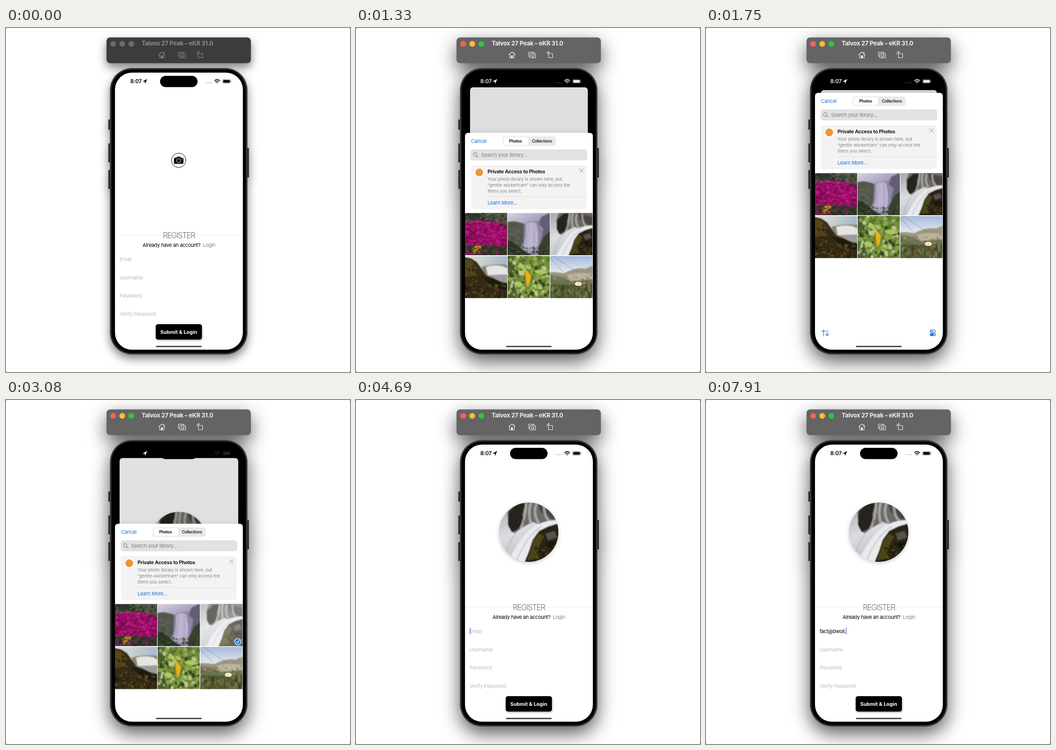
An HTML page for the animation above (8 s loop, 748 px wide and 748 px high).

```html
<!DOCTYPE html>
<html lang="en">
<head>
<meta charset="utf-8">
<title>Register screen</title>
<style>
  html, body { margin: 0; width: 100%; height: 100%; overflow: hidden; background: #555; }
  svg { display: block; width: 100vw; height: 100vh; }
  text { font: 400 11px Inter, "Open Sans", sans-serif; letter-spacing: -.36px; }
  .mid { text-anchor: middle; }
  .hint { fill: #bdbdbf; }
  .blue { fill: #2474d2; }
  .semi { font-weight: 600; letter-spacing: -.3px; }
  .tab { font-size: 8.7px; font-weight: 500; letter-spacing: -.25px; }
  .note { font-size: 9.6px; letter-spacing: -.12px; fill: #87878b; }
  .title { font-size: 13px; font-weight: 700; letter-spacing: -.3px; }
  .heading { font-size: 17px; font-weight: 200; letter-spacing: -1.2px; fill: #333; }
  .clock { font-size: 11.6px; font-weight: 600; letter-spacing: -.1px; }
  .line { fill: none; stroke: currentColor; stroke-linecap: round; stroke-linejoin: round; }
  .soft { filter: url(#blur); }

  #shell { filter: drop-shadow(0 9px 10px rgba(0, 0, 0, .5)); }
  #bar { fill: #3c3c3c; }
  #tools { color: #8b8b8b; }
  #lights circle { fill: #6b6b6b; }
  .active #shell { filter: drop-shadow(0 15px 20px rgba(0, 0, 0, .65)); }
  .active #bar { fill: #646464; }
  .active #tools { color: #efefef; }
  .active #lights circle:nth-child(1) { fill: #ff5f57; }
  .active #lights circle:nth-child(2) { fill: #febc2e; }
  .active #lights circle:nth-child(3) { fill: #28c840; }

  #avatar { filter: drop-shadow(0 2px 4px rgba(0, 0, 0, .22)); }
  #submit { filter: drop-shadow(1px 2px 2px rgba(0, 0, 0, .3)); }
  #sheetBase { filter: drop-shadow(0 0 8px rgba(0, 0, 0, .08)); }
</style>
</head>
<body>
<svg id="stage" viewBox="0 0 748 748">
  <defs>
    <filter id="blur" x="-.1" y="-.1" width="1.2" height="1.2"><feGaussianBlur stdDeviation=".9"/></filter>
    <clipPath id="screenClip"><rect x="237" y="97" width="278" height="602.6" rx="37"/></clipPath>
    <clipPath id="avatarClip"><circle cx="375.5" cy="287.5" r="64.5"/></clipPath>
    <linearGradient id="mist" x2=".5" y2="1">
      <stop stop-color="#d6d2e0"/><stop offset=".4" stop-color="#a9a1bf"/><stop offset="1" stop-color="#8f86ab"/>
    </linearGradient>
    <linearGradient id="dusk" x2="1" y2=".3">
      <stop stop-color="#e3e2d2"/><stop offset="1" stop-color="#a3b6c9"/>
    </linearGradient>
    <linearGradient id="day" x2="0" y2="1">
      <stop stop-color="#a5b9da"/><stop offset=".42" stop-color="#e9ecf1"/>
    </linearGradient>
    <linearGradient id="spray" x2=".5" y2="1">
      <stop stop-color="#a4a5a6"/><stop offset=".5" stop-color="#dcdde0"/><stop offset="1" stop-color="#b4b9c2"/>
    </linearGradient>

    <!-- flower bed -->
    <symbol id="flowers" viewBox="0 0 92 92">
      <path d="M0 0H92V92H0Z" fill="#30362a"/>
      <path d="M28 0H92V26L50 14Z" fill="#4c5442"/>
      <path d="M0 24Q26 10 54 18L92 32V74L50 70L0 68Z" fill="#8d0f5c"/>
      <g class="dots soft"></g>
    </symbol>
    <!-- tall waterfall -->
    <symbol id="falls" viewBox="0 0 92 92">
      <path d="M0 0H92V92H0Z" fill="url(#mist)"/>
      <g class="soft">
        <path d="M-4 20L14 18L32 22L42 28L36 58L30 74L-4 76Z" fill="#55594d"/>
        <path d="M36 24Q50 16 66 18L74 8L96 -2V64L68 80L34 78Z" fill="#8c85a3"/>
        <path d="M74 8L96 -2V56L72 62L78 34L68 24Z" fill="#645f72"/>
        <path d="M40 24Q52 17 62 22Q70 50 64 78H34Q42 50 40 24" fill="#bcb4d0"/>
        <path d="M46 24L40 74M58 23L58 74" stroke="#9a91b5" stroke-width="2" opacity=".7"/>
        <path d="M96 36L80 50L68 72L66 96H96Z" fill="#38402d"/>
        <path d="M-4 58Q18 62 32 80L60 96H-4Z" fill="#2b3521"/>
        <path d="M34 76Q50 72 66 78L58 88L42 86Z" fill="#a9a1c0"/>
      </g>
      <g class="dots soft"></g>
    </symbol>
    <!-- silky stream -->
    <symbol id="stream" viewBox="0 0 92 92">
      <path d="M0 0H92V92H0Z" fill="url(#spray)"/>
      <g class="soft">
        <path d="M20 -4H96V34L72 37L52 30L34 40L24 48L15 38L13 16Z" fill="#6d6a65"/>
        <path d="M15 14L28 2L42 0L36 18L40 30L28 42L20 46L14 34Z" fill="#25221c"/>
        <path d="M60 0L76 4L92 8V28L78 24L64 14Z" fill="#4c473f"/>
        <path d="M42 -2Q42 18 34 40M50 -2Q44 16 50 34M58 2Q52 18 62 32M70 2Q68 20 82 34" fill="none" stroke="#b9b9ba" stroke-width="4" opacity=".75"/>
        <path d="M92 27Q62 28 46 44Q28 60 12 96H42Q46 66 58 50Q70 38 92 36Z" fill="#e9eaed"/>
        <path d="M66 37Q44 50 26 92M24 50Q14 64 6 92" fill="none" stroke="#b3b6bd" stroke-width="2" opacity=".6"/>
        <path d="M96 31L76 37L62 44L52 58L47 74L38 96H96Z" fill="#292417"/>
        <path d="M53 60L62 48L70 52L62 68L60 86L44 90Z" fill="#4a4517"/>
        <path d="M72 48L86 44L90 54L76 59Z" fill="#55524b"/>
        <path d="M70 64L92 60V74L78 70Z" fill="#14120e"/>
      </g>
      <g class="dots soft"></g>
    </symbol>
    <!-- river bend -->
    <symbol id="river" viewBox="0 0 92 92">
      <path d="M0 0H92V92H0Z" fill="url(#dusk)"/>
      <g class="soft">
        <path d="M36 24Q62 16 96 20V48H44Z" fill="#8a8468"/>
        <path d="M46 24Q64 18 84 23L96 30V44H50Z" fill="#e6e5e2"/>
        <path d="M44 42L96 40V66L60 56Z" fill="#9b9d9c"/>
        <path d="M-4 2L14 6L26 14L36 28L46 42L62 48L78 56L96 60V96H-4Z" fill="#352c15"/>
        <path d="M-4 6L14 10L24 22L22 42L-4 46Z" fill="#55441f"/>
        <path d="M34 44L60 50L96 62V76L60 66Z" fill="#1f1b10"/>
      </g>
      <g class="dots soft"></g>
    </symbol>
    <!-- leaves -->
    <symbol id="leaves" viewBox="0 0 92 92">
      <path d="M0 0H92V92H0Z" fill="#748c3c"/>
      <path d="M0 0H18L12 50L22 92H0Z" fill="#4d5b37"/>
      <g class="dots soft"></g>
      <g class="soft">
        <path d="M20 22Q38 14 54 26Q38 36 20 22M58 34Q72 24 88 36Q72 46 58 34M52 64Q66 58 76 70Q62 78 52 64M14 60Q24 50 34 62Q24 76 14 60" fill="#b0c860"/>
        <path d="M28 0Q38 28 52 42T68 92" fill="none" stroke="#3f5220" stroke-width="1.5"/>
        <path d="M38 32Q53 36 50 54L43 67Q35 52 38 32Z" fill="#e3b515"/>
        <path d="M38 32Q33 50 42 67Q39 50 38 32Z" fill="#7c6a12"/>
      </g>
    </symbol>
    <!-- dunes -->
    <symbol id="dunes" viewBox="0 0 92 92">
      <path d="M0 0H92V92H0Z" fill="url(#day)"/>
      <g class="soft">
        <path d="M-4 36Q14 34 30 38Q56 24 76 28L96 20V72H-4Z" fill="#9c967f"/>
        <path d="M34 42Q56 34 96 40V50L46 54Z" fill="#bdb49e"/>
        <path d="M-4 40L26 46L46 56L96 50V96H-4Z" fill="#6d7150"/>
        <path d="M-4 62L96 62V96H-4Z" fill="#4a5630"/>
      </g>
      <path d="M0 4L32 40M6 0L60 36" stroke="#6d7480" stroke-width=".6"/>
      <g class="dots soft"></g>
      <ellipse cx="61" cy="61" rx="7.5" ry="4.5" fill="#f3f0d4"/>
      <circle cx="61" cy="61" r="2" fill="#e8cf56"/>
    </symbol>
  </defs>

  <rect width="748" height="748" rx="3" fill="#fff"/>

  <!-- simulator window -->
  <g id="shell">
    <rect id="bar" x="218.5" y="20.5" width="314" height="56" rx="8"/>
    <path d="M224.5 199V221M224.5 251V292M224.5 309V350M526.2 261V325" stroke="#2b2b2c" stroke-width="4"/>
    <rect x="226" y="87" width="299" height="623" rx="48" fill="#2c2c2e"/>
  </g>
  <rect x="227" y="88" width="297" height="621" rx="47" fill="none" stroke="#4a4a4c"/>
  <rect x="229.5" y="90.5" width="292" height="616" rx="44" fill="#000"/>
  <g id="lights">
    <circle cx="233" cy="34.5" r="6.2"/><circle cx="252.7" cy="34.5" r="6.2"/><circle cx="272.5" cy="34.5" r="6.2"/>
  </g>
  <g id="tools">
    <text class="title" x="295" y="38.3" fill="currentColor">Talvox 27 Peak – eKR 31.0</text>
    <g class="line" stroke-width="1.1">
      <path d="M332 58.5L339 52L346 58.5M334 57.5V65H344V57.5M343.5 55V52.5"/>
      <path d="M337.5 65V60H340.5V65Z" fill="currentColor"/>
      <path d="M377 61.5H375V52.5H387V54M378 56H381L382.5 54.5H386L387.5 56H390.5V65H378Z"/>
      <circle cx="384.3" cy="60.4" r="2.7"/>
      <path d="M418.5 55.5H427.5V64.5H418.5ZM415.5 57V54Q415.5 52.5 417 52.5H420M418.5 50.8L420.3 52.5L418.5 54.2"/>
    </g>
  </g>

  <g clip-path="url(#screenClip)">
    <rect x="237" y="97" width="278" height="603"/>
    <!-- register page -->
    <g id="page">
      <rect x="237" y="97" width="278" height="603" rx="7" fill="#fff"/>
      <g id="picker">
        <circle cx="375.5" cy="287.7" r="15.7" fill="#fff" stroke="#000"/>
        <path d="M367 282.2H370.5L372 279.8H379L380.5 282.2H384Q385.8 282.2 385.8 284V293.5Q385.8 295.3 384 295.3H367Q365.2 295.3 365.2 293.5V284Q365.2 282.2 367 282.2Z"/>
        <circle cx="375.5" cy="288.3" r="4.3" fill="none" stroke="#fff" stroke-width="1.1"/>
        <circle cx="382.8" cy="284.7" r=".9" fill="#fff"/>
      </g>
      <g id="avatar">
        <g clip-path="url(#avatarClip)"><use href="#stream" x="311" y="223" width="129" height="129"/></g>
      </g>
      <path d="M237 450.5H336M415 450.5H515" stroke="#ececec"/>
      <text class="heading" x="341" y="456.8">REGISTER</text>
      <text x="297" y="475.5">Already have an account?</text>
      <text x="428" y="475.5" fill="#858585">Login</text>
      <text id="email" x="247" y="506.5"></text>
      <rect id="caret" y="495" width="1.3" height="14.5" fill="#3a6fd0"/>
      <text class="hint" x="247" y="546.5">Username</text>
      <text class="hint" x="247" y="586.3">Password</text>
      <text class="hint" x="247" y="625.7">Verify Password</text>
      <rect id="submit" x="325.5" y="644" width="100.5" height="33.5" rx="5"/>
      <text class="mid" x="375.7" y="665" fill="#fff" style="font-weight:700;letter-spacing:0">Submit &amp; Login</text>
      <rect id="dim" x="237" y="97" width="278" height="603" rx="7"/>
    </g>

    <!-- photo sheet -->
    <g id="sheet">
      <rect id="sheetBase" x="237" width="278" height="640" rx="6.5" fill="#fff"/>
      <text class="blue" x="250" y="22">Cancel</text>
      <rect x="319" y="7.8" width="115" height="20.5" rx="5" fill="#e9e9ea"/>
      <rect x="320.2" y="9" width="54.5" height="18" rx="4.5" fill="#fff" stroke="#dcdcde" stroke-width=".6"/>
      <text class="tab mid" x="347" y="21.2" style="font-weight:600">Photos</text>
      <text class="tab mid" x="404.3" y="21.2">Collections</text>
      <rect x="249" y="36" width="254" height="24" rx="6" fill="#e2e2e3"/>
      <g class="line" color="#7d7d81" stroke-width="1.2">
        <circle cx="259.2" cy="47" r="3.8"/><path d="M262 50L265.2 53.2"/>
      </g>
      <text x="272" y="52" fill="#828286">Search your library...</text>
      <rect x="250" y="70" width="251.5" height="96" rx="6" fill="#f3f3f3"/>
      <rect x="258" y="76" width="20" height="20" rx="4.5" fill="#fff"/>
      <circle cx="268" cy="86" r="8.5" fill="#f0943a"/>
      <text class="semi" x="286" y="88">Private Access to Photos</text>
      <path class="line" color="#8c8c90" d="M485.5 77.5L495 87M495 77.5L485.5 87"/>
      <text class="note" x="286" y="103.6">Your photo library is shown here, but</text>
      <text class="note" x="286" y="116.6">“gentle-wickertram” can only access the</text>
      <text class="note" x="286" y="129.6">items you select.</text>
      <path d="M286 139H501.5" stroke="#dfdfe0"/>
      <text class="blue" x="286" y="156.3">Learn More...</text>
      <g id="grid"></g>
      <g id="check">
        <rect x="422.6" y="174.4" width="92.4" height="91.7" fill="#fff" opacity=".3"/>
        <circle cx="504" cy="256.5" r="6.8" fill="#1f7bf0" stroke="#fff" stroke-width="1.2"/>
        <path class="line" color="#fff" stroke-width="1.3" d="M501 256.7L503.2 259.2L507.2 253.8"/>
      </g>
      <g class="line" color="#2474d2" stroke-width="1.2">
        <path d="M255.5 528V516M252 519.5L255.5 516L259 519.5M263.5 516V528M260 524.5L263.5 528L267 524.5"/>
        <rect x="487.5" y="515.8" width="11.5" height="5" rx="2.5"/>
        <rect x="487.5" y="523.2" width="11.5" height="5" rx="2.5" fill="currentColor"/>
        <circle cx="490" cy="518.3" r="2.2"/>
        <circle cx="496.5" cy="525.7" r="1.6" fill="#fff" stroke="none"/>
      </g>
    </g>

    <rect x="335" y="104" width="81.5" height="24.5" rx="12.25"/>
    <g id="status">
      <text id="clock" class="clock" x="270.3" y="120.4">8:07</text>
      <path id="arrow" d="M307 111L297 116.2L301.8 116.8L302.4 121.6Z"/>
      <g fill="currentColor" opacity=".35">
        <circle cx="435" cy="119" r="1"/><circle cx="438.8" cy="119" r="1"/>
        <circle cx="442.6" cy="119" r="1"/><circle cx="446.4" cy="119" r="1"/>
      </g>
      <g class="line" stroke-width="1.8">
        <path d="M453.8 114.3Q459.2 109.5 464.6 114.3M455.9 116.8Q459.2 113.9 462.5 116.8"/>
        <path d="M457.8 118.7Q459.2 117.6 460.6 118.7L459.2 120.1Z" fill="currentColor" stroke-width=".5"/>
      </g>
      <rect x="470.8" y="111.6" width="17.5" height="8.8" rx="2.7" class="line" opacity=".4"/>
      <rect x="472.2" y="113" width="14.7" height="6" rx="1.6" fill="currentColor"/>
      <path d="M489.6 114.5V117.5" class="line" opacity=".4"/>
    </g>
    <rect x="326" y="691" width="99.5" height="3" rx="1.5" fill="#4c4c4c"/>
  </g>
</svg>

<script>
const $ = id => document.getElementById(id);
const LOOP = 8000, STEP = 70;
const FOCUS = 1050, OPEN = 1080, OPENED = 1750, CLOSE = 3012, PICKED = 3080, CLOSED = 3570;
const CARET_ON = 4690, CARET_FADE = 5460;
const ADDRESS = 'fact@bwoli.';
const KEYS = [5740, 6230, 6510, 6650, 7000, 7210, 7280, 7420, 7560, 7770, 7910];
const PHOTOS = ['flowers', 'falls', 'stream', 'river', 'leaves', 'dunes'];

function seeded(seed) {
  return () => (seed = seed * 16807 % 2147483647) / 2147483647;
}

// Sprinkles soft blots over one area of a photo; tall > 1 makes upright blades.
function scatter(id, count, [x, y, w, h], size, colors, tall = .65) {
  const rand = seeded(id.length * 7919 + count);
  let out = '';
  for (let i = 0; i < count; i++) {
    const cx = x + rand() * w, cy = y + rand() * h, r = size * (.5 + rand());
    out += `<ellipse cx="${cx.toFixed(1)}" cy="${cy.toFixed(1)}" rx="${r.toFixed(1)}" ` +
      `ry="${(r * tall).toFixed(1)}" fill="${colors[i % colors.length]}"/>`;
  }
  document.querySelector(`#${id} .dots`).innerHTML += out;
}

scatter('flowers', 90, [0, 0, 92, 22], 2, ['#4a5340', '#1f261b', '#666b5c']);
scatter('flowers', 260, [0, 18, 92, 52], 2.2, ['#c4148a', '#d01c96', '#a30f6c', '#5c0a3a']);
scatter('flowers', 90, [0, 68, 92, 24], 2.2, ['#1d2118', '#434930', '#9d1470']);
scatter('flowers', 16, [17, 72, 18, 15], 2.4, ['#f2a91c', '#e98717']);
scatter('falls', 70, [0, 74, 92, 18], 2, ['#3b4729', '#1e2717', '#4a5438']);
scatter('falls', 30, [0, 24, 34, 44], 2.5, ['#4a5040', '#62655a']);
scatter('stream', 50, [56, 58, 36, 34], 1.8, ['#544f18', '#1d1910', '#383115']);
scatter('river', 150, [0, 60, 92, 32], 2, ['#50481a', '#241f10', '#655826', '#181409']);
scatter('river', 40, [0, 20, 28, 40], 2.2, ['#2a2312', '#5c4a22']);
scatter('leaves', 170, [0, 0, 92, 92], 3.2, ['#8ba548', '#57742c', '#bccb90', '#33461c'], 1.2);
scatter('dunes', 60, [0, 42, 92, 22], 1.8, ['#7d8062', '#5f6848', '#a29b82']);
scatter('dunes', 150, [0, 64, 92, 28], 1.2, ['#5f7038', '#2f3c1e', '#7c4a38', '#7f8a52'], 3);

$('grid').innerHTML = PHOTOS.map((id, i) =>
  `<use href="#${id}" x="${237 + i % 3 * 92.8}" y="${174.4 + (i > 2) * 93.2}" width="91.7" height="91.7"/>`).join('');

// Critically damped spring from 0 to 1.
function spring(ms) {
  const x = Math.max(0, ms) * .0133;
  return 1 - (1 + x) * Math.exp(-x);
}

function presented(t) {
  if (t < OPEN || t >= CLOSED) return 0;
  if (t < OPENED) return spring(t - OPEN);
  return t < PICKED ? 1 : 1 - spring(t - CLOSE);
}

function show(id, on) {
  $(id).style.display = on ? '' : 'none';
}

function drawSheet(t) {
  const p = presented(t), picked = t >= PICKED;
  const scale = 1 - .0935 * p;
  $('page').setAttribute('transform',
    `translate(376 ${97 + 38 * p}) scale(${scale}) translate(-376 -97)`);
  $('dim').setAttribute('opacity', .155 * p);
  $('sheet').setAttribute('transform', `translate(0 ${141 + 559 * (1 - p)})`);
  show('sheet', p > 0);
  show('check', picked);
  show('avatar', picked);
  show('picker', !picked);
  const light = p > .4;
  $('status').style.color = light ? (picked ? '#222' : '#eee') : '#000';
  $('clock').setAttribute('fill', light && !picked ? '#eee' : '#000');
  $('arrow').setAttribute('fill', light ? '#fff' : '#000');
}

function drawField(t) {
  const typed = KEYS.filter(k => t >= k).length, email = $('email');
  email.textContent = typed ? ADDRESS.slice(0, typed) : 'Email';
  email.setAttribute('class', typed ? '' : 'hint');
  $('caret').setAttribute('x', typed ? 247 + email.getComputedTextLength() : 247.5);
  let alpha = t < CARET_ON ? 0 : 1;
  if (t >= CARET_FADE && !typed) alpha = Math.max(0, 1 - ((t - CARET_FADE) / STEP + 1) / 3);
  $('caret').setAttribute('opacity', alpha);
}

const start = performance.now();
let last = -1;

function frame() {
  const now = Math.max(0, performance.now() - start) % LOOP;
  const t = Math.floor(now / STEP) * STEP;
  if (t !== last) {
    last = t;
    $('stage').classList.toggle('active', t >= FOCUS);
    drawSheet(t);
    drawField(t);
  }
  requestAnimationFrame(frame);
}
frame();
</script>
</body>
</html>
```
